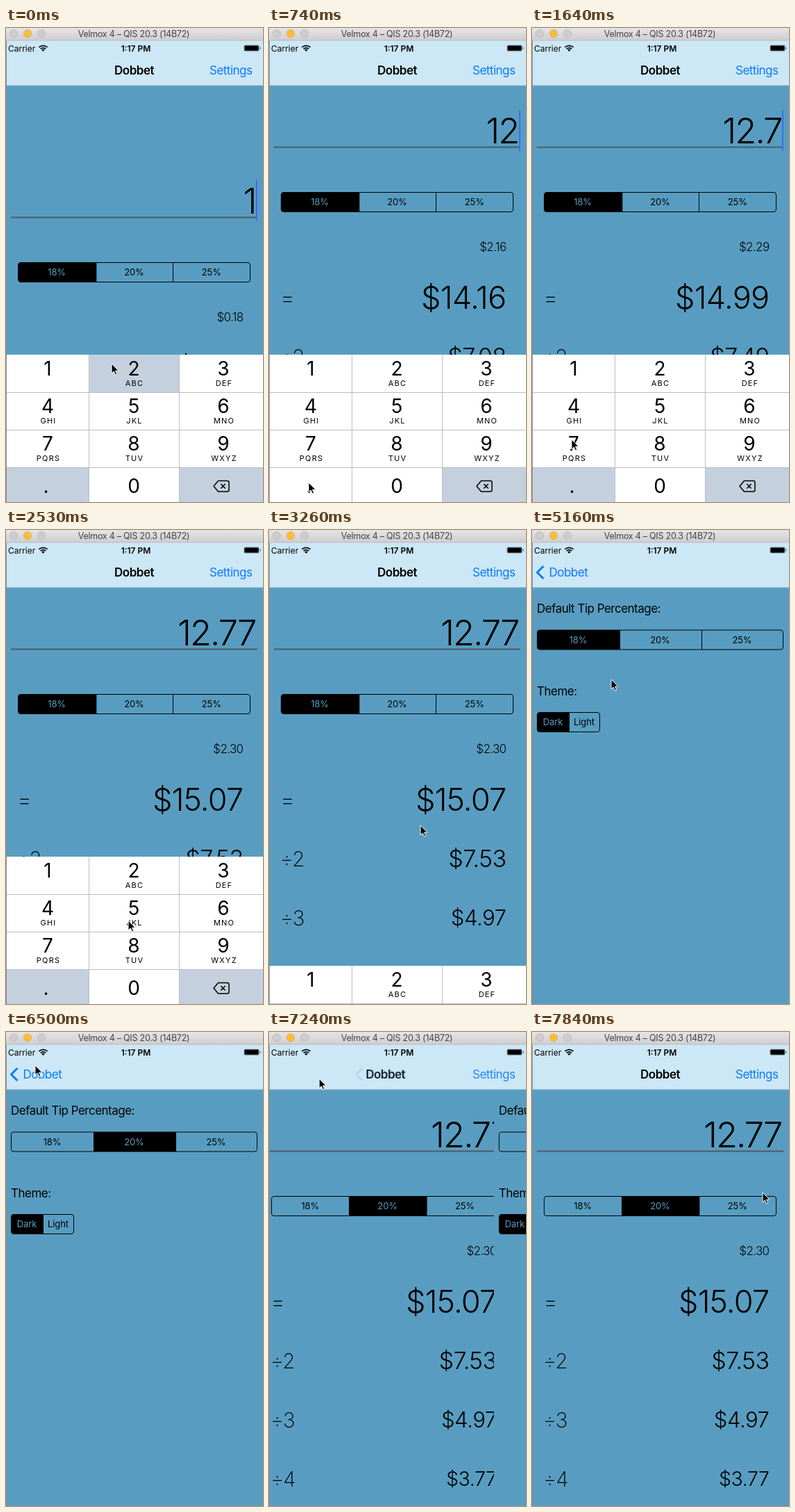
Write an HTML page that moves like this. It is 370x682 px and loops after 7990 ms.

```html
<!DOCTYPE html>
<html lang="en">
<head>
<meta charset="utf-8">
<title>Tip calculator</title>
<style>
html, body { margin: 0; width: 100%; height: 100%; overflow: hidden; background: #589dc1; }
svg { display: block; width: 100vw; height: 100vh; }
text { font-family: Inter, sans-serif; font-size: 17px; letter-spacing: -.03em; white-space: pre; }
.light { font-weight: 300; letter-spacing: -.037em; }
.amount { font-weight: 300; letter-spacing: -.015em; }
.thin { font-weight: 200; letter-spacing: -.04em; }
.small { font-size: 13px; letter-spacing: -.01em; }
.caption { font-size: 12.5px; letter-spacing: -.02em; fill: #444; }
.status { font-size: 12px; letter-spacing: 0; }
.bold { font-weight: 600; }
.digit { font-size: 28px; letter-spacing: 0; }
.letters { font-size: 11px; letter-spacing: 1.2px; }
.blue { fill: #0a7aff; }
</style>
</head>
<body>
<svg viewBox="0 0 370 682" preserveAspectRatio="none">
  <defs>
    <linearGradient id="chrome" x2="0" y2="1">
      <stop stop-color="#e6e4e6"/><stop offset="1" stop-color="#cfcdcf"/>
    </linearGradient>
  </defs>
  <rect width="370" height="682" fill="#589dc1"/>
  <g id="main"></g>
  <g id="settings"></g>
  <g id="keypad"></g>
  <rect y="18" width="370" height="65" fill="#cce7f5"/>
  <rect y="82.5" width="370" height="1" fill="#7ba8be"/>
  <g id="navMain"></g>
  <g id="navBack"></g>
  <g id="status"></g>
  <rect y="18" width="1" height="664" fill="#7d8b93"/>
  <g id="frame"></g>
  <path id="pointer" d="M0 0V14L3.2 11L5.6 16L7.8 15L5.5 10.2H10Z" stroke="#fff"/>
</svg>
<script>
const LOOP = 7990, STEPS = 54;
const BODY = '#589dc1', KEY_GRAY = '#c4d0de', BLUE = '#0a7aff';
const PERCENTS = ['18%', '20%', '25%'];
const byId = id => document.getElementById(id);

function add(parent, tag, attrs, content = '') {
  const el = document.createElementNS('http://www.w3.org/2000/svg', tag);
  for (const name in attrs) el.setAttribute(name, attrs[name]);
  el.textContent = content;
  parent.appendChild(el);
  return el;
}
const label = (parent, x, y, content, cls = '', anchor = 'start', size) =>
  add(parent, 'text', { x, y, class: cls, 'text-anchor': anchor, ...(size && { style: `font-size:${size}px` }) }, content);
const rect = (parent, x, y, width, height, fill, more = {}) =>
  add(parent, 'rect', { x, y, width, height, fill, ...more });
const outline = (parent, d, stroke, width) =>
  add(parent, 'path', { d, stroke, fill: 'none', 'stroke-width': width, 'stroke-linejoin': 'round' });

// Segmented control of equal cells; returns a select(index) function.
function segments(parent, x, y, width, names) {
  const cell = width / names.length, id = `seg${x}-${y}`;
  const shape = { x, y, width, height: 28, rx: 3.5 };
  add(add(parent, 'clipPath', { id }), 'rect', shape);
  const fills = add(parent, 'g', { 'clip-path': `url(#${id})` });
  const cells = names.map((name, i) => {
    const left = Math.round(x + i * cell);
    if (i) rect(parent, left, y, 1, 28, '#000');
    return {
      fill: rect(fills, left, y, cell + 1, 28, '#000'),
      text: label(parent, x + (i + .5) * cell, y + 18.5, name, 'small', 'middle')
    };
  });
  add(parent, 'rect', { ...shape, fill: 'none', stroke: '#000' });
  return index => cells.forEach(({ fill, text }, i) => {
    fill.setAttribute('opacity', i === index ? 1 : 0);
    text.setAttribute('fill', i === index ? BODY : '#000');
  });
}

// Window frame and status bar
const frame = byId('frame');
rect(frame, 0, 0, 370, 18, 'url(#chrome)');
rect(frame, 0, 17.5, 370, .8, '#b5b5b7');
['#cecccf', '#fdbd36', '#cecccf'].forEach((fill, i) =>
  add(frame, 'circle', { cx: 11 + i * 20, cy: 8, r: 5.7, fill, stroke: '#0002', 'stroke-width': .8 }));
label(frame, 184, 13, 'Velmox 4 – QIS 20.3 (14B72)', 'caption', 'middle');

const status = byId('status');
label(status, 3, 33.5, 'Carrier', 'status');
label(status, 187, 33.5, '1:17 PM', 'status bold', 'middle');
[6.2, 3.8].forEach(half => {
  const y = 33.8 - half;
  outline(status, `M${53.5 - half} ${y}Q53.5 ${y - half * .75} ${53.5 + half} ${y}`, '#000', 1.7);
});
add(status, 'path', { d: 'M51.2 31.4Q53.5 29.6 55.8 31.4L53.5 33.8Z' });
rect(status, 342.5, 24.5, 22, 9, '#0006', { rx: 2 });
rect(status, 343.5, 25.5, 20, 7, '#000', { rx: 1 });
rect(status, 365.4, 27.5, 1.2, 3, '#0009', { rx: .6 });

// Navigation bar
const navMain = byId('navMain'), navBack = byId('navBack');
const title = label(navMain, 184.5, 67, 'Dobbet', 'bold', 'middle');
const settingsLink = label(navMain, 293, 67, 'Settings', 'blue');
outline(navBack, 'M16.5 52L7.5 61L16.5 70', BLUE, 3);
label(navBack, 24.5, 67, 'Dobbet', 'blue');

// Calculator screen: each result row is centred on its own line
const main = byId('main');
const bill = label(main, 359.5, 166, '', 'light', 'end', 50.5);
rect(main, 7, 170.5, 355, 2, '#4f5a62');
const caret = rect(main, 360, 118, 2, 59, '#3f6fe8');
const selectTip = segments(main, 17.5, 236.5, 334, PERCENTS);
const tip = label(main, 341.5, 321, '', 'light', 'end');
const rows = [['=', 33, 45, 1], ['÷2', 30, 34, .5], ['÷3', 30, 31, .33], ['÷4', 30, 28.5, .25]];
const shares = rows.map(([name, nameSize, size, part], i) => {
  const baseline = fontSize => 388 + i * 85 + fontSize * .363;
  label(main, 16, baseline(nameSize), name, 'thin', 'start', nameSize);
  return { part, text: label(main, 341.5, baseline(size), '', 'amount', 'end', size) };
});

// Settings screen
const settings = byId('settings');
rect(settings, 0, 83, 370, 599, BODY);
label(settings, 7, 119, 'Default Tip Percentage:');
const selectDefault = segments(settings, 7.5, 144, 354, PERCENTS);
label(settings, 7, 237.5, 'Theme:');
segments(settings, 7.5, 262.5, 90, ['Dark', 'Light'])(0);

// Keypad
const keypad = byId('keypad'), keys = {};
const letters = ' ABC DEF GHI JKL MNO PQRS TUV WXYZ'.split(' ');
[...'123456789.0', ''].forEach((name, i) => {
  const col = i % 3, row = Math.floor(i / 3), y = 470 + row * 54;
  const center = 60 + col * 126.5 - (name === '.' ? 2.5 : 0) - (col === 1 ? 2.5 : 0);
  const idle = '.'.includes(name) ? KEY_GRAY : '#fff';
  const left = col && col * 130 - 10.5;
  keys[name] = { idle, el: rect(keypad, left, y, 130, 54, idle) };
  label(keypad, center, y + (row === 3 ? 36.5 : 30), name, 'digit', 'middle');
  if (letters[i]) label(keypad, center + 1, y + 45, letters[i], 'letters', 'middle');
  rect(keypad, left, y, 130, row && 1, '#b9bdc1');
  rect(keypad, left - .5, y, 1, 54, '#b9bdc1');
});
outline(keypad, 'M305.5 651.5H318.5Q321 651.5 321 654V664.5Q321 667 318.5 667H305.5L299 659.3Z' +
  'M309.3 656L315.7 662.5M315.7 656L309.3 662.5', '#000', 1.5);

const taps = [['2', 0], ['.', 5], ['7', 10], ['7', 13]];
const moves = [ // leave, arrive, x, y
  [1, 5, 57, 654], [7, 9, 57, 592], [15, 17, 176, 562], [17, 20, 218, 425], [23, 28, 326, 55],
  [31, 35, 114, 215], [35, 39, 190, 165], [40, 44, 42, 48], [48, 53, 332, 231]
];
const clamp = v => Math.min(1, Math.max(0, v));
const easeInOut = v => v * v * (3 - 2 * v);
const easeOut = v => 1 - (1 - v) ** 3;
const progress = (step, from, to, ease) => ease(clamp((step - from) / (to - from)));

function pointerAt(step) {
  return moves.reduce(([x, y], [leave, arrive, toX, toY]) => {
    const k = progress(step, leave, arrive, easeInOut);
    return [x + (toX - x) * k, y + (toY - y) * k];
  }, [152, 483]);
}
const shift = (el, x, y) => el.setAttribute('transform', `translate(${x} ${y})`);
const fade = (el, value) => el.setAttribute('opacity', value);
const dollars = value => '$' + value.toFixed(2);

function render(step) {
  const entry = '1' + taps.filter(([, at]) => step > at).map(([key]) => key).join('');
  const amount = parseFloat(entry);
  bill.textContent = entry;
  tip.textContent = dollars(amount * .18);
  shares.forEach(({ part, text }) => { text.textContent = dollars(amount * 1.18 * part); });
  fade(caret, step < 16 ? 1 : 0);

  const chosen = step >= 40 ? 1 : 0;
  selectTip(chosen);
  selectDefault(chosen);

  for (const name in keys) {
    const { idle, el } = keys[name];
    const down = taps.some(([key, at]) => key === name && at === step);
    el.setAttribute('fill', down === (idle === '#fff') ? KEY_GRAY : '#fff');
  }

  const push = progress(step, 29, 33, easeInOut) - progress(step, 47, 51, easeOut);
  shift(main, -111 * push, 101 * (1 - progress(step, 1, 4, easeInOut)));
  shift(settings, 370 * (1 - push), 0);
  shift(keypad, 0, 212 * progress(step, 20, 23, easeInOut));
  shift(title, -135 * push, 0);
  shift(navBack, 135 * (1 - push), 0);
  fade(navMain, 1 - push);
  fade(navBack, push * (step === 46 || step === 47 ? .25 : 1));
  fade(settingsLink, step === 29 ? .22 : 1);
  shift(byId('pointer'), ...pointerAt(step));
}

// The picture holds between steps; the small lead absorbs their uneven lengths.
function tick() {
  const time = performance.now() % LOOP;
  render(Math.min(STEPS - 1, Math.floor((time + 16) / 147.8)));
  requestAnimationFrame(tick);
}
tick();
</script>
</body>
</html>
```
